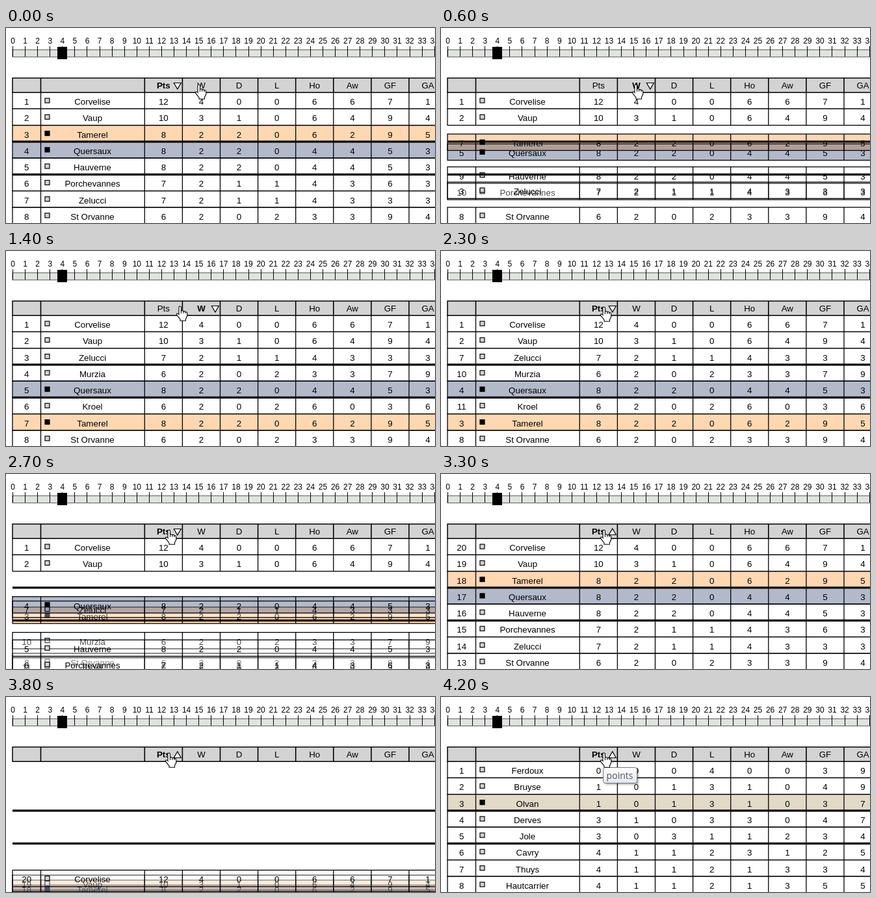
An HTML page with a canvas that plays this animation: 660x300 px, repeating every 4300 ms.

```html
<!DOCTYPE html>
<html lang="en">
<head>
<meta charset="utf-8">
<title>Sortable league table</title>
<style>
html, body { margin: 0; width: 660px; height: 300px; overflow: hidden; background: #fff; }
canvas { display: block; }
</style>
</head>
<body>
<canvas id="stage" width="660" height="300"></canvas>
<script>
const ctx = document.getElementById('stage').getContext('2d');
const LOOP = 4300, STEP = 100;
const LEFT = 10, RIGHT = 670, TOP = 99.1, ROW = 25.25;
const FONT = '"Liberation Sans", Arial, sans-serif';
const HEADS = ['Pts', 'W', 'D', 'L', 'Ho', 'Aw', 'GF', 'GA'];
const colX = i => 213.3 + 58.1 * i;
const EDGES = [53.5, ...HEADS.map((_, i) => colX(i))];

// Painted bottom to top: name, "W D home GF GA" digits, rank by points, rank by wins, tint
const TEAMS = [
  ['Ferdoux', '00039', 20, 20], ['Bruyse', '01149', 19, 19],
  ['Olvan', '01137', 18, 18, '153,132,72'], ['Derves', '10347', 17, 17],
  ['Jole', '03134', 16, 16], ['Cavry', '11325', 15, 15],
  ['Thuys', '11134', 14, 14], ['Hautcarrier', '11155', 13, 13],
  ['St Orvanne', '20394', 8, 8], ['Kroel', '20636', 11, 6],
  ['Murzia', '20379', 10, 4], ['Porchevannes', '21463', 6, 10],
  ['Hauverne', '22453', 5, 9], ['Tamerel', '22695', 3, 7, '255,127,0'],
  ['Zelucci', '21433', 7, 3], ['Quersaux', '22453', 4, 5, '0,27,80'],
  ['Vaup', '31694', 2, 2], ['Corvelise', '40671', 1, 1]
].map(([name, digits, byPoints, byWins, tint]) => {
  const [w, d, home, gf, ga] = [...digits].map(Number);
  const pts = 3 * w + d;
  return { name, tint, cells: [pts, w, d, 4 - w - d, home, pts - home, gf, ga],
           ranks: [byPoints, byWins, byPoints, 21 - byPoints] };
});

// Each sort: when labels, header and row movement begin
const SORTS = [
  { label: 200, head: 200, move: 355 },
  { label: 2100, head: 2100, move: 2332 },
  { label: 3200, head: 3300, move: 3463 }
];
const MOVE_TIME = 760;

// Cursor: time, x, y
const CURSOR = [
  [0, 291, 87], [100, 291, 87], [400, 294, 87], [1100, 294, 87], [1200, 284, 86],
  [1300, 271, 86], [1400, 262, 85], [1500, 253, 85], [1600, 245, 85], [1700, 240, 85],
  [1800, 238, 86], [1900, 242, 86], [2000, 242, 86], [2100, 245, 86], [LOOP, 245, 86]
];

const clamp = v => Math.max(0, Math.min(1, v));
const ease = u => u < .5 ? 4 * u ** 3 : 1 - 4 * (1 - u) ** 3;
const stateAt = (t, key) => SORTS.filter(s => t >= s[key]).length;

function text(str, x, y, size = 13.33, weight = '') {
  ctx.font = `${weight} ${size}px ${FONT}`;
  ctx.fillText(str, x, y);
}

function line(x1, y1, x2, y2, width) {
  ctx.lineWidth = width;
  ctx.beginPath();
  ctx.moveTo(x1, y1);
  ctx.lineTo(x2, y2);
  ctx.stroke();
}

function box(x, y, w, h, fill, width, stroke = '#000') {
  ctx.fillStyle = fill;
  ctx.fillRect(x, y, w, h);
  ctx.lineWidth = width;
  ctx.strokeStyle = stroke;
  ctx.strokeRect(x, y, w, h);
  ctx.fillStyle = ctx.strokeStyle = '#000';
}

function drawSlider() {
  box(LEFT, 33.5, RIGHT - LEFT, 11, '#e0e3e0', 1.3, '#777');
  for (let i = 0; i <= 34; i++) {
    const x = LEFT + 19.08 * i;
    line(Math.round(x) + .5, 28, Math.round(x) + .5, 44, 1);
    text(i, x + .5, 24, 12);
  }
  ctx.fillRect(79, 29, 15, 19);
}

function drawHeader(state) {
  box(LEFT, 77, RIGHT - LEFT, 22.2, '#d3d3d3', 1.5);
  EDGES.forEach(x => line(x, 77, x, 99.2, 1.6));
  const sorted = state === 1 ? 1 : 0;
  HEADS.forEach((h, i) => text(h, colX(i) + 29.05, 93, 13.33, i === sorted ? 'bold' : ''));
  const x = colX(sorted) + 50.5, dir = state === 3 ? -1 : 1;
  ctx.beginPath();
  ctx.moveTo(x - 5.5, 89 - 4.5 * dir);
  ctx.lineTo(x + 5.5, 89 - 4.5 * dir);
  ctx.lineTo(x, 89 + 5 * dir);
  ctx.closePath();
  ctx.fillStyle = '#fff';
  ctx.fill();
  ctx.lineWidth = 1.2;
  ctx.stroke();
  ctx.fillStyle = '#000';
}

function drawRow(team, rank, label) {
  const y = TOP + ROW * (rank - 1);
  if (y > 302) return;
  box(LEFT, y, RIGHT - LEFT, ROW, `rgba(${team.tint || '255,255,255'},.3)`, 1.3);
  EDGES.forEach(x => line(x, y, x, y + ROW, 1.3));
  box(60, y + 9, 7, 7, team.tint ? '#000' : '#d3d3d3', 1.2);
  const base = y + 18.9;
  text(label, 31.7, base);
  text(team.name, 133, base);
  team.cells.forEach((v, i) => text(v, colX(i) + 29.05, base));
}

function drawRows(t) {
  const label = stateAt(t, 'label');
  const moves = SORTS.map(s => ease(clamp((t - s.move) / MOVE_TIME)));
  for (const team of TEAMS) {
    const r = team.ranks;
    const rank = moves.reduce((sum, p, i) => sum + p * (r[i + 1] - r[i]), r[0]);
    drawRow(team, rank, r[label]);
  }
  [3, 5].forEach(n => line(LEFT, TOP + ROW * n, 660, TOP + ROW * n, 3.2));
}

function drawTooltip() {
  const shade = ctx.createLinearGradient(0, 108, 0, 133);
  shade.addColorStop(0, '#fff');
  shade.addColorStop(1, '#e4e5f0');
  ctx.save();
  ctx.shadowColor = 'rgba(0,0,0,.35)';
  ctx.shadowBlur = 3;
  ctx.shadowOffsetX = ctx.shadowOffsetY = 2;
  ctx.beginPath();
  ctx.roundRect(249.5, 108.5, 52, 24, 3);
  ctx.fillStyle = shade;
  ctx.fill();
  ctx.restore();
  ctx.lineWidth = 1;
  ctx.strokeStyle = '#767676';
  ctx.stroke();
  ctx.fillStyle = '#575757';
  ctx.font = '14px "Open Sans", "Noto Sans", sans-serif';
  ctx.fillText('points', 275, 126);
}

const hand = new Path2D('M4 13V2.2C4 0 7.5 0 7.5 2.2V8C8.5 6.8 10.5 7 10.8 8.5' +
  'C12 7.5 13.6 8 14 9.5C15.5 8.8 16.8 9.8 16.8 11.5V15.5L14.5 20V22.7H6V20.5' +
  'L1 14.2C-.6 11.8 2 10.2 4 13Z');

function drawCursor(t) {
  const i = CURSOR.findIndex(k => k[0] > t);
  const a = CURSOR[i - 1], b = CURSOR[i], u = (t - a[0]) / (b[0] - a[0]);
  ctx.save();
  ctx.translate(a[1] + (b[1] - a[1]) * u, a[2] + (b[2] - a[2]) * u - .5);
  ctx.fillStyle = '#fff';
  ctx.strokeStyle = '#000';
  ctx.lineWidth = 1.1;
  ctx.fill(hand);
  ctx.stroke(hand);
  [7.5, 10.8, 14].forEach((x, n) => line(x, 8 + n * .6, x, 11.5, 1));
  ctx.restore();
}

function draw(t) {
  ctx.fillStyle = '#fff';
  ctx.fillRect(0, 0, 660, 300);
  ctx.fillStyle = ctx.strokeStyle = '#000';
  ctx.textAlign = 'center';
  drawSlider();
  drawRows(t);
  drawHeader(stateAt(t, 'head'));
  if (t >= 4200) drawTooltip();
  drawCursor(t);
}

const start = performance.now();
function tick() {
  const ms = Math.max(0, performance.now() - start) % LOOP;
  draw(Math.floor(ms / STEP) * STEP);
  requestAnimationFrame(tick);
}
tick();
</script>
</body>
</html>
```
